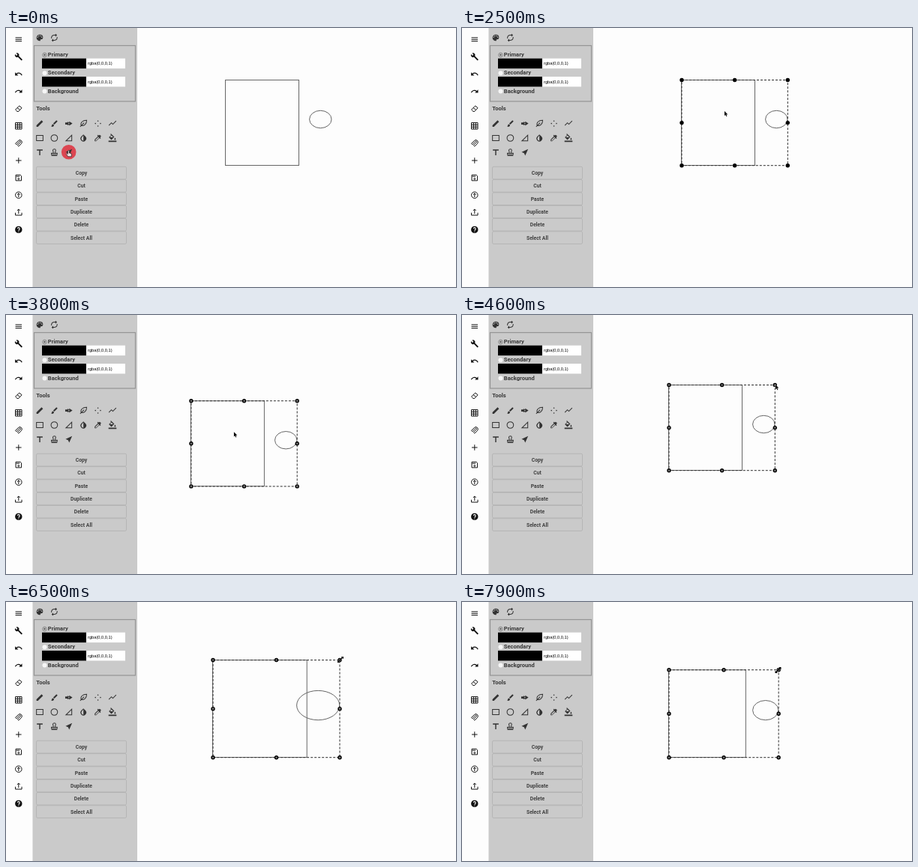
Recreate the animation shown at these times as an HTML page. Size 600 by 346 pixels, loop 8000 ms.

```html
<!DOCTYPE html>
<html lang="en">
<head>
<meta charset="utf-8">
<title>Drawing app: select, move, resize</title>
<style>
  html, body { margin: 0; width: 100%; height: 100%; overflow: hidden; background: #fdfdfd; }
  svg { display: block; width: 100vw; height: 100vh; }
  text { font-family: Roboto, sans-serif; font-weight: 700; fill: #383838; }
  .label { font-size: 7.6px; }
  .value { font: 5.7px "Liberation Sans", Arial, sans-serif; fill: #000; }
  .button text { font-size: 6.8px; text-anchor: middle; fill: #404040; }
  .button rect { fill: #cacaca; stroke: #b0b0b0; stroke-width: .8; }
  .fill { fill: currentColor; fill-rule: evenodd; }
  .line { fill: none; stroke: currentColor; stroke-width: 2.1; }
  #bar { color: #111; }
  #tools { color: #333; }
  .shape { fill: none; stroke: #666; }
  #frame { fill: none; stroke: #2c2c2c; stroke-dasharray: 3 2; }
  #handles { fill: #000; stroke: #000; stroke-width: 1.4; }
  #handles.moved { fill: #777; }
  #hand { fill: #f4e4e5; stroke: #222; stroke-width: .7; }
  .cursor { fill: #000; stroke: #fff; stroke-width: .6; paint-order: stroke; }
</style>
</head>
<body>
<svg viewBox="0 0 600 346" preserveAspectRatio="none">
  <rect width="600" height="346" fill="#fdfdfd"/>
  <rect x="35.5" width="139.5" height="346" fill="#cacaca"/>
  <g id="bar"></g>

  <rect x="37.5" y="23.5" width="135" height="74.5" fill="none" stroke="#949494" stroke-width="1.2"/>
  <g id="colours"></g>
  <circle cx="51.5" cy="36" r="2.8" fill="#ddd" stroke="#666" stroke-width=".8"/>
  <circle cx="51.5" cy="36" r="1.4" fill="#666"/>

  <text class="label" x="40.3" y="110.3">Tools</text>
  <circle id="glow" cx="83.7" cy="165.8" r="9.8" fill="#dc4651"/>
  <g id="tools"></g>
  <g id="buttons"></g>

  <rect id="box" class="shape"/>
  <ellipse id="oval" class="shape"/>
  <rect id="frame"/>
  <g id="handles"></g>

  <path id="hand" d="M-1 -3q1-1 1.8 0v3l3 .8v4h-4.6l-2.4-3.4q0-1.2 1.2-.6l1 .6z"/>
  <path id="arrow" class="cursor" d="M0 0v6.2l1.4-1.2 1 2.3 1-.4-1-2.3h2z"/>
  <path id="resize" class="cursor" d="M4 -4v3.4l-1.1-1.2-4.7 4.7 1.2 1.1h-3.4v-3.4l1.1 1.2 4.7-4.7-1.2-1.1z"/>
</svg>

<script>
const $ = id => document.getElementById(id);

function set(el, attrs) {
  for (const key in attrs) el.setAttribute(key, attrs[key]);
  return el;
}
function add(parent, tag, attrs, text = "") {
  const el = document.createElementNS("http://www.w3.org/2000/svg", tag);
  el.textContent = text;
  return parent.appendChild(set(el, attrs));
}

// Icons are drawn on a 24-unit grid; a leading "~" means outline only.
function icon(parent, x, y, size, art) {
  const outline = art[0] === "~";
  add(parent, "path", {
    class: outline ? "line" : "fill",
    d: outline ? art.slice(1) : art,
    transform: `translate(${x} ${y}) scale(${size / 24}) translate(-12 -12)`
  });
}

const dot = (x, y, r) => `M${x - r} ${y}a${r} ${r} 0 1 0 ${2 * r} 0a${r} ${r} 0 1 0 ${-2 * r} 0z`;

// Dots spread evenly on an arc around the icon centre.
function ring(count, from, step, radius, r) {
  return Array.from({ length: count }, (_, i) => {
    const a = (from + i * step) * Math.PI / 180;
    return dot(12 + radius * Math.cos(a), 12 + radius * Math.sin(a), r);
  }).join("");
}

const art = {
  menu: "~M3 7h18M3 12h18M3 17h18",
  wrench: "M2 5l4 4 3-3-4-4a6 6 0 0 1 8 8l10 10-3 3-10-10a6 6 0 0 1-8-8z",
  undo: "M2 7v9h9l-3.6-3.6a8 8 0 0 1 12.7 3.6l2.4-.8a10.5 10.5 0 0 0-16.9-4.6z",
  redo: "M22 7v9h-9l3.6-3.6a8 8 0 0 0-12.7 3.6l-2.4-.8a10.5 10.5 0 0 1 16.9-4.6z",
  eraser: "~M8 20l-5-5L14 4l7 6-9 10zM8 9l8 7",
  grid: "~M3 3h18v18H3zM9 3v18M15 3v18M3 9h18M3 15h18",
  magnet: "~M3 13l8-8a6 6 0 0 1 9 8l-8 8-3-3 8-8a2 2 0 0 0-3-3l-8 9z",
  plus: "~M12 4v16M4 12h16",
  save: "~M4 4h13l3 3v13H4zM5 8h10" + dot(12, 15, 2),
  upload: "~M12 18V7M8 11l4-4 4 4" + dot(12, 12, 9),
  share: "~M12 16V3M8 7l4-4 4 4M3 13v7h18v-7",
  help: dot(12, 12, 10) + "M11 17h2v2h-2zM11 15q0-3 2-4t0-3-3 1H8q0-4 4-4t4 4-3 6z",

  palette: "M12 3a9 9 0 0 0 0 18c3 0 1-3 2-4s7 1 7-6a9 8 0 0 0-9-8z" + ring(4, 195, 50, 5.8, 1.5),
  sync: "~M4 14q0-9 8-9h6M15 2l3 3-3 3M20 10q0 9-8 9H6M9 16l-3 3 3 3",
  pencil: "M3 21v-4L17 3l4 4L7 21z",
  brush: "M9 12l9-9 3 3-9 9zM3 20c3-1 1-3 4-6 6 0 5 7 0 7z",
  shaper: "M2 9h6v-2l5 2V6l9 6-9 6v-3l-5 2v-2H2z" + dot(12, 12, 1.5),
  feather: "~M3 21L14 10M6 18C3 9 10 3 21 3c0 10-6 16-15 15",
  spray: ring(4, 0, 90, 7, 1.7),
  polyline: "~M2 17l7-7 4 4 9-9",
  rect: "~M3 5h18v14H3z",
  circle: "~" + dot(12, 12, 9),
  triangle: "~M20 4v16H4z",
  drop: "M12 2l6 6a8 8 0 1 1-12 0zM12 5v14.5a6 6 0 0 1-4-10z",
  dropper: "M3 21v-5l9-9-2-2 2-2 2 2 3-2 4 4-3 3 2 2-2 2-2-2-9 9zM5 19h2l8-8-2-2-8 8z",
  bucket: "M6 1l2-1 9 9-8 8-7-7 6-6zM9 5l-4 5h9zM19 11q4 6 0 6t0-6M1 19h22v4H1z",
  type: "M4 4v3h6.5v13h3V7H20V4z",
  stamp: "~M4 21h16M4 14h16v4H4zM9 14q1-4-1-7a4 4 0 0 1 8 0q-2 3-1 7",
  send: "M21 3L3 11l7 3 3 7z"
};

"menu wrench undo redo eraser grid magnet plus save upload share help".split(" ")
  .forEach((name, i) => icon($("bar"), 16.8, 15.3 + i * 23.1, 11.3, art[name]));

const toolRows = {
  13: "palette sync",
  127.6: "pencil brush shaper feather spray polyline",
  147: "rect circle triangle drop dropper bucket",
  166.2: "type stamp send"
};
for (const y in toolRows)
  toolRows[y].split(" ").forEach((name, i) => icon($("tools"), 45 + i * 19.4, y, 11.6, art[name]));

["Primary", "Secondary", "Background"].forEach((name, i) => {
  const y = 35.9 + i * 24.3, g = $("colours");
  add(g, "circle", { cx: 51.5, cy: y, r: 3, fill: "#f6f6f6" });
  add(g, "text", { class: "label", x: 55.8, y: y + 2.2 }, name);
  if (name === "Background") return;
  add(g, "rect", { x: 107, y: y + 4.8, width: 52, height: 13.4, fill: "#fff" });
  add(g, "rect", { x: 48, y: y + 4.8, width: 59, height: 13.4, fill: "#000" });
  add(g, "text", { class: "value", x: 109, y: y + 13.5 }, "rgba(0,0,0,1)");
});

["Copy", "Cut", "Paste", "Duplicate", "Delete", "Select All"].forEach((name, i) => {
  const y = 193.6 + i * 17.3, g = add($("buttons"), "g", { class: "button" });
  add(g, "rect", { x: 40.5, y: y - 8.3, width: 120, height: 16.6, rx: 1.6 });
  add(g, "text", { x: 100.5, y: y + 2.4 }, name);
});

// Eight handles around the selection, without the centre.
const handles = [];
for (const u of [0, .5, 1]) for (const v of [0, .5, 1])
  if (u !== .5 || v !== .5) handles.push({ u, v, el: add($("handles"), "circle", { r: 2 }) });

const span = (t, from, to) => Math.min(1, Math.max(0, (t - from) / (to - from)));
const ease = (t, from, to) => {
  const k = span(t, from, to);
  return k * k * (3 - 2 * k);
};

// The selection is dragged down left, then part of the way back.
function shiftAt(t) {
  const out = ease(t, 2600, 3350), back = ease(t, 3500, 4200);
  return { x: 48 * back - 65 * out, y: 59 * out - 35 * back };
}

// Its corner is pulled out quickly, then drifts back in.
function growAt(t) {
  const x = 28 * Math.sin(span(t, 5500, 6600) * Math.PI / 2) - 25 * ease(t, 6900, 8100);
  return { x, y: -.575 * x };
}

// The pointer sums its own moves and the drags; while resizing it runs a step ahead.
function pointerAt(t) {
  const leave = ease(t, 100, 700), select = ease(t, 1300, 1900);
  const enter = ease(t, 1950, 2450), toCorner = ease(t, 4200, 4600);
  const shift = shiftAt(t), grow = growAt(t + 100);
  return {
    x: 83.5 + 164.5 * leave + 214 * select - 112 * enter + 85 * toCorner + shift.x + grow.x,
    y: 167 - 140 * leave + 206 * select - 122 * enter - 42 * toCorner + shift.y + grow.y
  };
}

function draw(t) {
  const shift = shiftAt(t), grow = growAt(t), pointer = pointerAt(t);
  const top = 69.5 + shift.y + grow.y;

  set($("box"), { x: 292.5 + shift.x, y: top, width: 98 + grow.x, height: 114 - grow.y });
  const rx = 14.7 + grow.x / 2, ry = 11.7 - grow.y / 2;
  set($("oval"), { cx: 404.6 + shift.x + rx, cy: 133.7 + shift.y - ry, rx, ry });

  const chosen = t >= 2000;
  const frame = chosen
    ? { x: 293 + shift.x, y: top, width: 141.3 + grow.x, height: 114.2 - grow.y }
    : { x: 248.5, y: 27.5, width: Math.max(0, pointer.x - 248.5), height: Math.max(0, pointer.y - 27.5) };
  set($("frame"), frame);
  $("frame").style.display = t >= 1400 ? "" : "none";
  $("handles").style.display = chosen ? "" : "none";
  $("handles").classList.toggle("moved", t >= 2700);
  for (const { u, v, el } of handles)
    set(el, { cx: frame.x + frame.width * u, cy: frame.y + frame.height * v });

  $("glow").style.opacity = 1 - span(t, 200, 700);

  const kind = t < 300 ? "hand" : t < 5200 ? "arrow" : "resize";
  for (const id of ["hand", "arrow", "resize"]) $(id).style.display = id === kind ? "" : "none";
  set($(kind), { transform: `translate(${pointer.x} ${pointer.y})` });
}

// The picture advances in 100 ms steps.
const start = performance.now();
function tick() {
  const t = (performance.now() - start) % 8000;
  draw(Math.floor(t / 100) * 100);
  requestAnimationFrame(tick);
}
tick();
</script>
</body>
</html>
```
